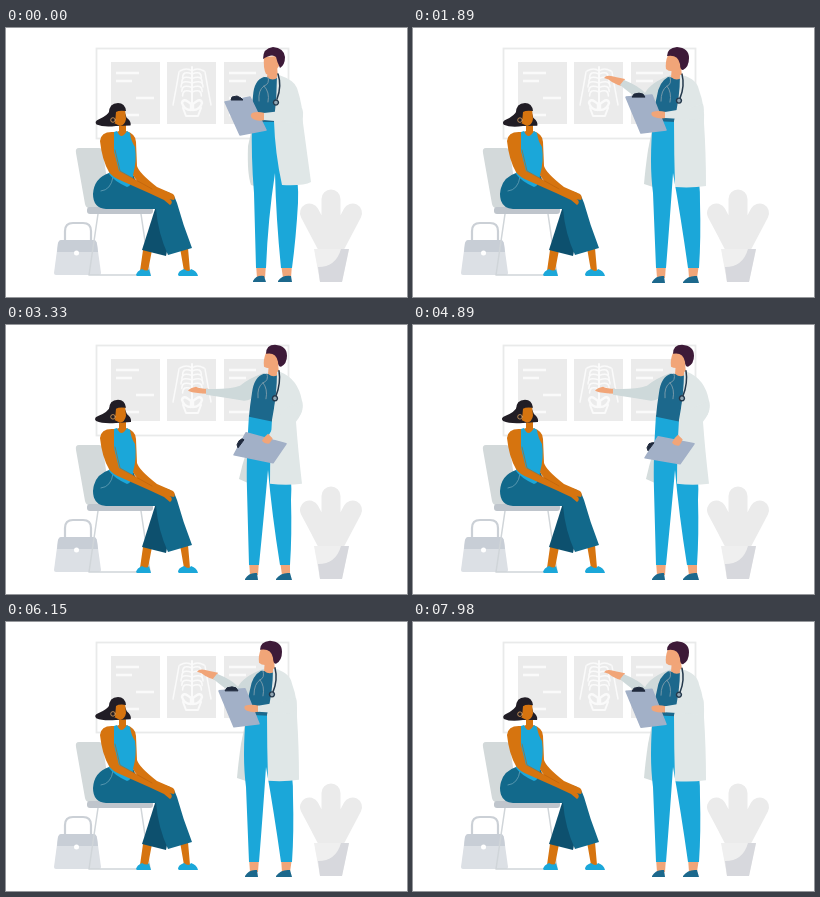
An HTML page for the animation above (8000 ms loop, 401 by 269 pixels).

```html
<!DOCTYPE html>
<html lang="en">
<head>
<meta charset="utf-8">
<title>Consultation</title>
<style>
html, body { margin: 0; width: 100%; height: 100%; overflow: hidden; background: #fff; }
svg { display: block; width: 100vw; height: 100vh; }
.line { fill: none; stroke-linecap: round; stroke-linejoin: round; }
</style>
</head>
<body>
<svg viewBox="0 0 401 269" preserveAspectRatio="none">
  <g id="board">
    <rect x="90.5" y="20.5" width="192" height="90" fill="#fff" stroke="#e9eaea" stroke-width="1.8"/>
    <g fill="#ebebeb">
      <rect x="105" y="34" width="49" height="62"/>
      <rect x="161" y="34" width="49" height="62"/>
      <rect x="218" y="34" width="49" height="62"/>
    </g>
    <path class="line" stroke="#fafafa" stroke-width="2.6" style="stroke-linecap:butt"
      d="M110 45H133M110 53H126M130 70H148M110 87H133M223 45H250M223 53H240M223 70H243M223 87H243"/>
    <g class="line" id="bones" stroke="#fafafa" stroke-width="1.5">
      <path stroke-width="2" d="M186 39V75"/>
      <path d="M174 43Q181 39 186 43Q191 39 198 43M173 44L170 61L167 77M199 44L202 61L205 77"/>
      <path stroke-width="2.4" d="M185 76Q177 69 176 75Q178 82 185 82ZM187 76Q195 69 196 75Q194 82 187 82Z"/>
      <path stroke-width="2" d="M177 80L180 88H192L195 80"/>
    </g>
  </g>

  <g id="plant">
    <path class="line" stroke="#ebebeb" stroke-width="19" d="M325 171V224M303.500 185L323 222M346.500 185L327 222"/>
    <path fill="#efefef" d="M308 221H343L336 254H314Z"/>
    <path fill="#d7d8dd" d="M343 221L336 254H314L312 239Q330 239 335 221Z"/>
  </g>

  <g id="bag">
    <path class="line" stroke="#cbd0d6" stroke-width="2.200" d="M59 213V203Q59 195 67 195H77Q85 195 85 203V213"/>
    <path fill="#dce0e5" d="M55 212H88Q90 212 91 216L95 245Q95 247 93 247H50Q48 247 48 245L52 215Q53 212 55 212Z"/>
    <path fill="#c8ced6" d="M55 212H88Q90 212 91 216L92 224H51L52 215Q53 212 55 212Z"/>
    <circle cx="70.500" cy="225" r="2.500" fill="#fff"/>
  </g>

  <g id="chair">
    <path class="line" stroke="#d0d5d9" stroke-width="1.500" d="M92 186L83 247H144L135 186"/>
    <path fill="#d3d9da" d="M73 120H93Q96 120 97 124L105 180H83Q80 180 79 176L70 125Q69 120 73 120Z"/>
    <rect x="81" y="179" width="66" height="7" rx="3" fill="#bfc5cc"/>
  </g>

  <g id="patient">
    <path fill="#d6740f" d="M137 222H146L142 243H134ZM174 220H182L184 243H178Z"/>
    <path fill="#1ba7d9" d="M130 247Q131 243 136 241Q141 244 143 241L145 248H131ZM172 247Q172 243 178 241Q183 245 185 241Q191 243 192 248H173Z"/>
    <path fill="#0d506e" d="M150 178L136 222L160 228L168 190Z"/>
    <path fill="#12698b" d="M103 145Q88 150 87 166Q87 180 100 181H150Q152 205 162 227L186 220Q177 197 171 175Q168 164 158 163L130 154L127 146Z"/>
    <path class="line" stroke="#73aabd" stroke-width=".7" d="M95 163Q105 162 107 149"/>
    <path fill="#d6740f" d="M113 94L120 94V103Q130 106 130 114L131 138Q133 145 151 159L167 166Q170 169 168 172L162 171L146 165Q130 155 126 145L121 118L103 107L113 103Z"/>
    <path fill="#1ba7d9" d="M108 104L111 103Q115 113 121 103L124 105Q125 113 129 119Q131 133 127 147Q127 157 121 159Q108 153 103 146Q106 130 104 119Z"/>
    <path fill="#d6740f" d="M108 104Q95 103 94 113Q96 132 103 144Q106 149 116 153L143 165L158 172L164 177Q167 175 165 172L153 164L147 161L113 143L108 123Z"/>
    <path class="line" stroke="#b9610c" stroke-width=".6" d="M109 122L114 143L146 161"/>
    <path id="tail" fill="#211d25"/>
    <g id="patientHead">
      <path fill="#d6740f" d="M107 81H119L120 91Q119 97 114 98L108 95Z"/>
      <path fill="#211d25" d="M103 85Q103 75 112 75Q119 75 120 83Q113 82 110 84L109 95L103 95Z"/>
      <circle class="line" cx="107" cy="92" r="2.300" stroke="#e2a45d" stroke-width=".8"/>
    </g>
  </g>
  <g id="legs"></g>
  <g id="upper"></g>
</svg>
<script>
const NS = "http://www.w3.org/2000/svg";
const LOOP = 8000;
const $ = id => document.getElementById(id);
const NUM = /-?\d*\.?\d+/g;
const SKIN = "#f1a578", BLUE = "#1ba7d9", TEAL = "#1c688c", COAT = "#e0e7e7";

function add(parent, attrs) {
  const el = document.createElementNS(NS, "path");
  for (const k in attrs) el.setAttribute(k, attrs[k]);
  return parent.appendChild(el);
}

// Blend two paths that share the same commands.
function blend(a, b, k) {
  if (a === b || k === 0) return a;
  const to = b.match(NUM);
  let i = 0;
  return a.replace(NUM, n => {
    const d = +to[i++] - n;
    return d ? (+n + d * k).toFixed(2) : n;
  });
}

for (let i = 0; i < 5; i++) {
  const y = 46 + i * 4.5, w = 11 - Math.abs(i - 2) * .8;
  add($("bones"), { d: `M186 ${y}Q${186 - w} ${y - 4} ${186 - w} ${y + 4}M186 ${y}Q${186 + w} ${y - 4} ${186 + w} ${y + 4}` });
}

// Each part: group, style, then its shape reading, presenting, pointing, and tilting the pad.
const parts = [];
function part(group, style, ...poses) {
  if (poses.length < 4) poses.push(poses[2]);
  parts.push({ el: add($(group), style), poses });
}
const fill = c => ({ fill: c });
const line = (c, w) => ({ class: "line", stroke: c, "stroke-width": w });

// Coat back
part("legs", fill("#d5dddd"),
  "M246 100L242 118Q241 146 245 157L252 159L258 110Z",
  "M241 92L235 122Q232 143 231 156L240 159L256 110Z",
  "M244 95L241 125Q236 140 233 154L242 158L258 110Z");
// Pants
part("legs", fill(SKIN),
  "M250 236L260 236L259 250L251 250ZM275 236L286 236L285 250L277 250Z",
  "M243 236L253 236L252 250L244 250ZM275 236L286 236L284 250L276 250Z",
  "M243 236L253 236L252 250L244 250ZM274 236L284 236L284 250L276 250Z");
part("legs", fill(BLUE),
  "M246 92Q245 130 248 165L250 240L260 240Q262 190 269 145Q270 190 275 240L286 240Q290 210 292 175Q294 130 272 92Z",
  "M240 92Q236 135 240 165L243 240L253 240Q257 190 260 145Q268 190 275 240L286 240Q288 210 287 175Q288 130 264 92Z",
  "M243 90Q240 135 241 165L243 240L253 240Q258 190 262 145Q266 190 274 240L284 240Q286 210 285 175Q288 130 266 90Z");
// Shoes
part("legs", fill(TEAL),
  "M247 253Q250 247 258 248L260 254L247 254ZM272 253Q276 247 285 248L286 254L272 254Z",
  "M239 254Q243 247 251 248L252 255L239 255ZM270 254Q275 247 284 248L286 255L270 255Z",
  "M239 254Q243 247 251 248L252 255L239 255ZM270 254Q275 247 284 248L286 255L270 255Z");
// Far arm
part("upper", fill(SKIN),
  "M244 88Q240 86 238 88Q236 88 236 90Q237 92 238 92Q241 93 243 92Z",
  "M212 51Q202 49 198 48Q193 47 191 50Q196 51 199 54Q204 57 209 58Z",
  "M202 64Q194 64 190 62Q184 63 182 66Q186 68 190 68Q196 69 202 69Z");
part("upper", fill("#ced9da"),
  "M254 66Q250 76 248 80Q246 86 243 92L241 90Q246 80 247 70Q248 56 258 48Z",
  "M254 66Q246 76 238 77Q230 76 207 57L211 52Q226 58 232 65Q238 54 258 47Z",
  "M250 68Q246 76 238 76Q220 73 200 70L200 64Q222 65 234 61Q242 54 258 48Z");
// Torso
part("upper", fill(TEAL),
  "M258 49Q248 52 247 68Q245 80 249 94L271 94L274 70L273 50Z",
  "M255 49Q246 54 244 68Q241 80 239 93L263 94L268 70L269 50Z",
  "M258 49Q248 52 246 68Q244 80 243 92L267 97L270 70L273 50Z");
// Head
part("upper", fill(SKIN),
  "M262 40L271 38L272 49Q267 54 261 49Z",
  "M259 38L268 38L269 49Q264 54 258 49Z",
  "M263 38L272 38L273 49Q268 54 262 49Z");
part("upper", fill(SKIN),
  "M258 29Q257 40 260 46Q264 48 268 45L273 38L272 28Z",
  "M255 27Q252 34 253 41Q256 44 262 43L269 37L268 26Z",
  "M260 28Q257 35 258 42Q261 44 267 43L274 38L273 27Z");
part("upper", fill("#3d1a38"),
  "M257 31Q257 20 267 19Q278 20 279 29Q279 37 274 40Q271 34 270 29Q266 25 257 31Z",
  "M254 28Q254 20 264 19Q276 20 276 30Q276 39 270 42Q267 42 267 36Q265 26 254 28Z",
  "M260 29Q260 20 269 20Q281 21 281 31Q281 39 275 42Q272 42 272 37Q270 27 260 29Z");
// Coat front
part("upper", fill(COAT),
  "M273 47Q288 52 291 60Q297 78 297 95Q301 125 305 154Q298 158 276 157Q269 125 268 93Q271 70 271 47Z",
  "M269 47Q284 51 286 62Q292 78 291 95Q293 125 293 158Q280 160 262 159Q261 125 261 93Q267 70 267 47Z",
  "M274 47Q292 54 296 76Q299 86 290 97Q292 125 296 159Q280 161 264 159Q264 125 266 95Q271 70 271 47Z");
// Stethoscope
part("upper", line("#7f9eac", .9),
  "M262 49Q264 56 258 58Q252 62 253 73M258 58Q264 64 262 74",
  "M257 49Q259 56 254 58Q248 62 248 73M254 58Q259 64 257 74",
  "M261 49Q263 56 257 58Q251 62 252 73M257 58Q262 64 260 74");
part("upper", line("#24384b", 1.5),
  "M272 46Q276 58 271 71",
  "M269 46Q272 58 267 70",
  "M273 46Q275 58 270 71");
part("upper", { fill: "#91a6b3", stroke: "#24384b", "stroke-width": 1.4 },
  "M270 72a2.500 2.500 0 1 1 -.1 0Z",
  "M266 70a2.500 2.500 0 1 1 -.1 0Z",
  "M269 71a2.500 2.500 0 1 1 -.1 0Z");
// Clipboard
part("upper", { fill: "#a2b0c7", stroke: "#a2b0c7", "stroke-width": 1.5, "stroke-linejoin": "round" },
  "M219 74L244 69L260 102L234 107Z",
  "M213 69L239 67L253 102L228 105Z",
  "M228 130L240 108L280 119L267 138Z",
  "M232 133L245 112L281 119L267 139Z");
part("upper", { fill: "#202a3d", stroke: "#202a3d", "stroke-width": 1, "stroke-linejoin": "round" },
  "M225 72L226 69L231 68L235 70L237 72Z",
  "M219 69L221 66L226 65L230 66L232 69Z",
  "M232 123L231 120L233 116L236 114L238 115Z",
  "M235 126L234 123L236 119L239 118L241 118Z");
// Near arm
part("upper", fill(SKIN),
  "M259 85Q251 83 246 85Q243 88 247 91Q252 94 259 92Z",
  "M253 84Q245 82 239 84Q237 87 241 89Q246 91 253 90Z",
  "M267 113Q265 117 263 119Q258 119 256 116Q258 112 262 109Z",
  "M270 114Q268 119 266 121Q261 121 259 118Q261 113 265 110Z");
part("upper", fill(COAT),
  "M296 80Q300 92 290 95L258 92L258 85L284 82Z",
  "M290 76Q293 90 284 92L252 90L252 84L276 80Z",
  "M296 76Q298 88 292 92L268 115L263 110L278 84Z",
  "M296 76Q298 88 292 93L271 116L266 111L278 84Z");

const READ = 0, PRESENT = 1, POINT = 2, TILT = 3;
const keys = [
  [0, READ], [860, READ], [1640, PRESENT], [2070, PRESENT], [2870, POINT],
  [3400, POINT], [4800, TILT], [5310, TILT], [6120, PRESENT], [LOOP, PRESENT]
];
const ease = k => k * k * (3 - 2 * k);

// Idle motion runs only inside these spans.
const spans = [[0, 1650], [1800, 1890], [2070, 6990], [7200, 7260], [7650, LOOP]];
const idleTime = t => spans.reduce((sum, [a, b]) => sum + Math.max(0, Math.min(t, b) - a), 0);

const tailLeft = "M104 82Q102 88 93 92Q89 94 91 97Q98 100 110 98L124 98Q125 94 120 90L118 82Z";
const tailRight = "M104 82Q102 87 92 91Q87 93 90 96Q97 99 110 98L125 97Q126 93 121 89L118 82Z";

function draw(t) {
  let i = 0;
  while (i < keys.length - 2 && t >= keys[i + 1][0]) i++;
  const [t0, from] = keys[i], [t1, to] = keys[i + 1];
  const k = ease(Math.min(1, (t - t0) / (t1 - t0)));
  for (const p of parts) p.el.setAttribute("d", blend(p.poses[from], p.poses[to], k));

  const sway = Math.sin(idleTime(t) / 1620 * 2 * Math.PI);
  $("upper").setAttribute("transform", `translate(0 ${(sway * .25).toFixed(3)})`);
  $("patientHead").setAttribute("transform", `translate(0 ${(sway * .2).toFixed(3)})`);
  $("tail").setAttribute("d", blend(tailLeft, tailRight, (1 - sway) / 2));
}

const start = performance.now();
function tick() {
  draw((performance.now() - start) % LOOP);
  requestAnimationFrame(tick);
}
tick();
</script>
</body>
</html>
```
